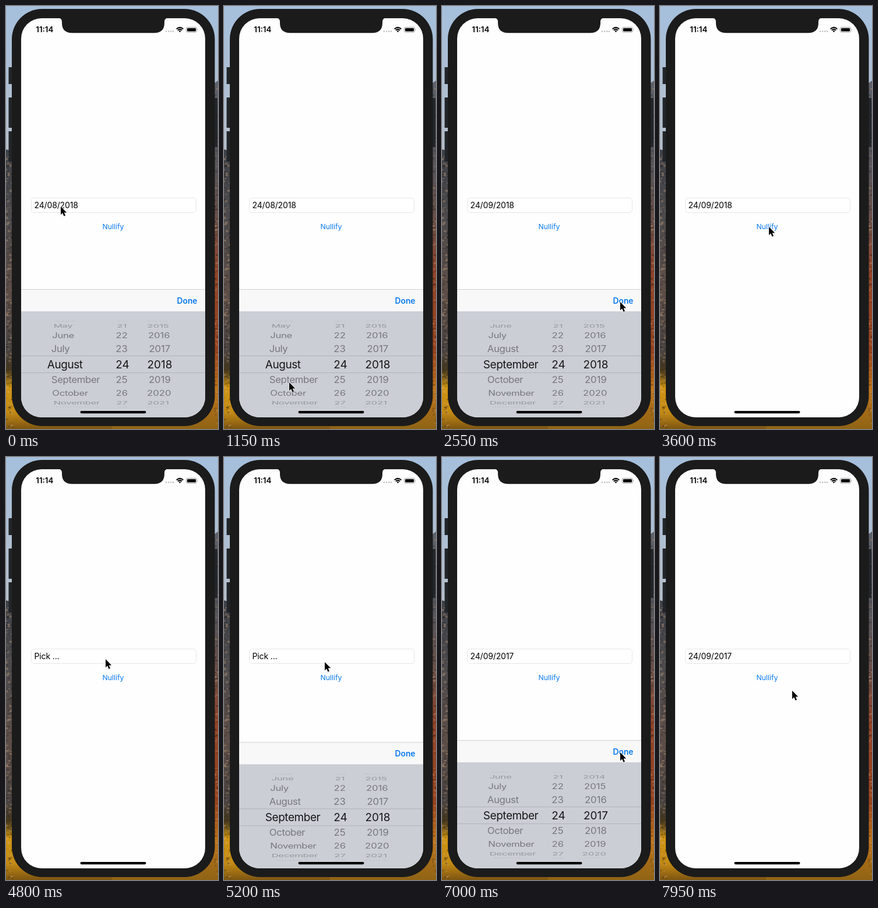
Write an HTML page that moves like this. It is 364 px wide and 726 px high and loops after 8000 ms.

```html
<!DOCTYPE html>
<html lang="en">
<head>
<meta charset="utf-8">
<title>Date picker field</title>
<style>
html, body { margin: 0; width: 100%; height: 100%; overflow: hidden; }
svg { display: block; width: 364px; height: 726px; font-family: Inter, "Open Sans", sans-serif; }
.month { letter-spacing: -.02em; }
.day, .year { text-anchor: middle; }
</style>
</head>
<body>
<svg viewBox="0 0 364 726" xmlns="http://www.w3.org/2000/svg">
  <defs>
    <linearGradient id="sky" x1="0" y1="0" x2="0" y2="1">
      <stop offset="0" stop-color="#a5bfdc"/>
      <stop offset=".34" stop-color="#b6bfcb"/>
    </linearGradient>
    <linearGradient id="left" x1="0" y1="0" x2="0" y2="1">
      <stop offset="0" stop-color="#3e4148"/>
      <stop offset=".25" stop-color="#4d4b4d"/>
      <stop offset=".5" stop-color="#5d4e48"/>
      <stop offset=".72" stop-color="#4a4442"/>
      <stop offset=".79" stop-color="#45371c"/>
      <stop offset=".85" stop-color="#cf9514"/>
      <stop offset=".94" stop-color="#c48a14"/>
      <stop offset="1" stop-color="#7d5512"/>
    </linearGradient>
    <linearGradient id="right" x1="0" y1="0" x2="0" y2="1">
      <stop offset="0" stop-color="#5e626b"/>
      <stop offset=".25" stop-color="#555358"/>
      <stop offset=".4" stop-color="#6b5049"/>
      <stop offset=".55" stop-color="#93452a"/>
      <stop offset=".78" stop-color="#98421d"/>
      <stop offset=".88" stop-color="#c0741a"/>
      <stop offset="1" stop-color="#8f6415"/>
    </linearGradient>
    <clipPath id="screen"><rect x="26" y="21" width="316" height="685" rx="35"/></clipPath>
    <clipPath id="band"><rect x="26" y="600" width="316" height="29.5"/></clipPath>
    <clipPath id="rest"><path d="M26 524H342V600H26ZM26 629.5H342V706H26Z"/></clipPath>
  </defs>

  <rect width="364" height="726" fill="url(#sky)"/>
  <path d="M0 246L14 250H182V726H0Z" fill="url(#left)"/>
  <path d="M364 128L350 138H182V726H364Z" fill="url(#right)"/>
  <g id="rocks"></g>

  <path d="M10 105H4.500V134H10ZM10 157H4.500V209H10ZM10 215H4.500V267H10ZM357 158H363V242H357Z" fill="#222529"/>
  <rect x="10" y="5" width="348.500" height="716" rx="52" fill="#1b1b1b"/>

  <g clip-path="url(#screen)">
    <rect x="26" y="21" width="316" height="685" fill="#fefefe"/>
    <rect x="43.500" y="329.500" width="283" height="25" rx="4.500" fill="#fff" stroke="#e6e6e6"/>
    <text id="field" x="48.500" y="347.200" font-size="14" letter-spacing="-.01em"></text>
    <text x="184" y="383.300" font-size="12.300" text-anchor="middle" fill="#0a7aee">Nullify</text>
    <g id="sheet">
      <rect x="26" y="486" width="316" height="38" fill="#f8f8f8"/>
      <path d="M26 486.500H342" stroke="#d0d1d4"/>
      <text x="328.500" y="510.500" font-size="13.800" font-weight="600" text-anchor="end" fill="#0a7aee">Done</text>
      <rect x="26" y="524" width="316" height="182" fill="#cbced5"/>
      <g id="faded" clip-path="url(#rest)"></g>
      <g id="picked" clip-path="url(#band)"></g>
      <path d="M26 600.500H342M26 629.500H342" stroke="#b0b3b9"/>
    </g>
    <rect x="127.500" y="695" width="113" height="4.200" rx="2.100"/>
  </g>

  <path d="M90 20.500Q96 21 96 27V29Q96 46.300 114 46.300H254Q272 46.300 272 29V27Q272 21 278 20.500Z" fill="#1b1b1b"/>
  <text x="51.300" y="45.300" font-size="13.300" font-weight="600">11:14</text>
  <path d="M275 43.500h.01M279.200 43.500h.01M283.300 43.500h.01M287 43.500h.01" stroke="#bdbdbd" stroke-width="2.600" stroke-linecap="round"/>
  <g fill="none" stroke="#000" stroke-width="2">
    <path d="M292.700 39.400Q298.500 34.300 304.300 39.400M294.900 41.700Q298.500 38.600 302.100 41.700"/>
    <path d="M296.600 42.900Q298.500 41.400 300.400 42.900L298.500 45.200Z" fill="#000" stroke="none"/>
  </g>
  <rect x="309.500" y="36.500" width="18" height="8.500" rx="2.400" fill="none" stroke="#999"/>
  <rect x="311" y="38" width="15" height="5.500" rx="1.200"/>
  <path d="M328.700 39.300q1.400 1.400 0 2.900z" fill="#999"/>

  <path id="pointer" d="M0 0V14.300L3.200 11.300L5.500 16.800L8 15.700L5.700 10.400H10.200Z" stroke="#fff" stroke-width="1.200" stroke-linejoin="round" paint-order="stroke"/>
</svg>
<script>
const LOOP = 8000, SLIDE = 400, SPIN = 300;
const OPEN = 4900, CLOSE = [2700, 7150], MONTH_TAP = 1300, YEAR_TAP = 5915, NULLIFY = 3750;
const MONTHS = ['January', 'February', 'March', 'April', 'May', 'June', 'July',
  'August', 'September', 'October', 'November', 'December'];
const MID = 614.8, RADIUS = 74.3, STEP = 20.9 * Math.PI / 180, REACH = 4;

const $ = id => document.getElementById(id);
const clamp = u => Math.max(0, Math.min(1, u));
const smooth = u => (u = clamp(u)) * u * (3 - 2 * u);
const easeOut = u => 1 - (1 - clamp(u)) ** 3;

function add(parent, tag, attrs) {
  const el = document.createElementNS('http://www.w3.org/2000/svg', tag);
  for (const k in attrs) el.setAttribute(k, attrs[k]);
  return parent.appendChild(el);
}

// Time, x and y of each stop of the pointer
const STOPS = [
  [350, 94, 344], [1000, 112, 646], [1800, 112, 646], [2450, 306, 508],
  [2850, 306, 508], [3500, 187, 379], [4050, 187, 379], [4650, 171, 347],
  [5150, 171, 347], [5750, 269, 587], [6450, 269, 587], [6950, 306, 507],
  [7300, 306, 507], [7850, 227, 401]
];

function pointerAt(t) {
  const i = STOPS.findIndex(s => s[0] > t);
  if (i === 0) return STOPS[0].slice(1);
  if (i < 0) return STOPS[STOPS.length - 1].slice(1);
  const [t0, x0, y0] = STOPS[i - 1], [t1, x1, y1] = STOPS[i];
  const u = smooth((t - t0) / (t1 - t0));
  return [x0 + (x1 - x0) * u, y0 + (y1 - y0) * u];
}

// x of the small and large labels, and the drift towards the middle as rows turn away
function wheel(name, small, large, drift, label) {
  const rows = [];
  for (let d = -REACH; d <= REACH; d++) {
    rows.push({
      d,
      faded: add($('faded'), 'text', { class: name, 'font-size': 16.7, y: 6 }),
      picked: add($('picked'), 'text', { class: name, 'font-size': 18.9, y: 6.8, fill: '#151618' })
    });
  }
  return pos => {
    const base = Math.round(pos);
    for (const { d, faded, picked } of rows) {
      const angle = (base + d - pos) * STEP, cos = Math.max(0, Math.cos(angle));
      const y = MID + RADIUS * Math.sin(angle);
      const place = (el, x) => {
        el.textContent = label(base + d);
        el.setAttribute('transform', `translate(${x + drift * (1 - cos)} ${y}) scale(1 ${cos})`);
      };
      place(faded, small);
      place(picked, large);
      faded.setAttribute('opacity', .42 * Math.min(1, 1.4 * cos));
    }
  };
}

const spinMonth = wheel('month', 77.3, 70.8, 8, i => MONTHS[(i + 12) % 12]);
const spinDay = wheel('day', 198.5, 200, 1, String);
const spinYear = wheel('year', 264.2, 264, -5.5, String);

function scatterRocks() {
  let seed = 7;
  const rnd = () => (seed = seed * 16807 % 2147483647) / 2147483647;
  for (let i = 0; i < 420; i++) {
    const right = rnd() < .4, top = right ? 140 : 252;
    add($('rocks'), 'ellipse', {
      cx: right ? 358 + rnd() * 6 : rnd() * 11,
      cy: top + rnd() * (726 - top),
      rx: 1 + rnd() * 2, ry: .6 + rnd() * 1.4,
      fill: rnd() < .6 ? '#1c1714' : '#d9b08a',
      opacity: .12 + rnd() * .25
    });
  }
}

function render(t) {
  const monthSpin = smooth((t - MONTH_TAP) / SPIN);
  const yearSpin = smooth((t - YEAR_TAP) / SPIN);
  spinMonth(7 + monthSpin);
  spinDay(24);
  spinYear(2018 - yearSpin);

  const shut = easeOut((t - CLOSE[0]) / SLIDE) - easeOut((t - OPEN) / SLIDE) + easeOut((t - CLOSE[1]) / SLIDE);
  $('sheet').setAttribute('transform', `translate(0 ${221 * shut})`);

  $('field').textContent = yearSpin === 1 ? '24/09/2017'
    : t >= NULLIFY ? 'Pick ...'
    : monthSpin === 1 ? '24/09/2018' : '24/08/2018';

  $('pointer').setAttribute('transform', `translate(${pointerAt(t)})`);
}

scatterRocks();
const start = performance.now();
function tick(now) {
  render(Math.max(0, now - start) % LOOP);
  requestAnimationFrame(tick);
}
render(0);
requestAnimationFrame(tick);
</script>
</body>
</html>
```
